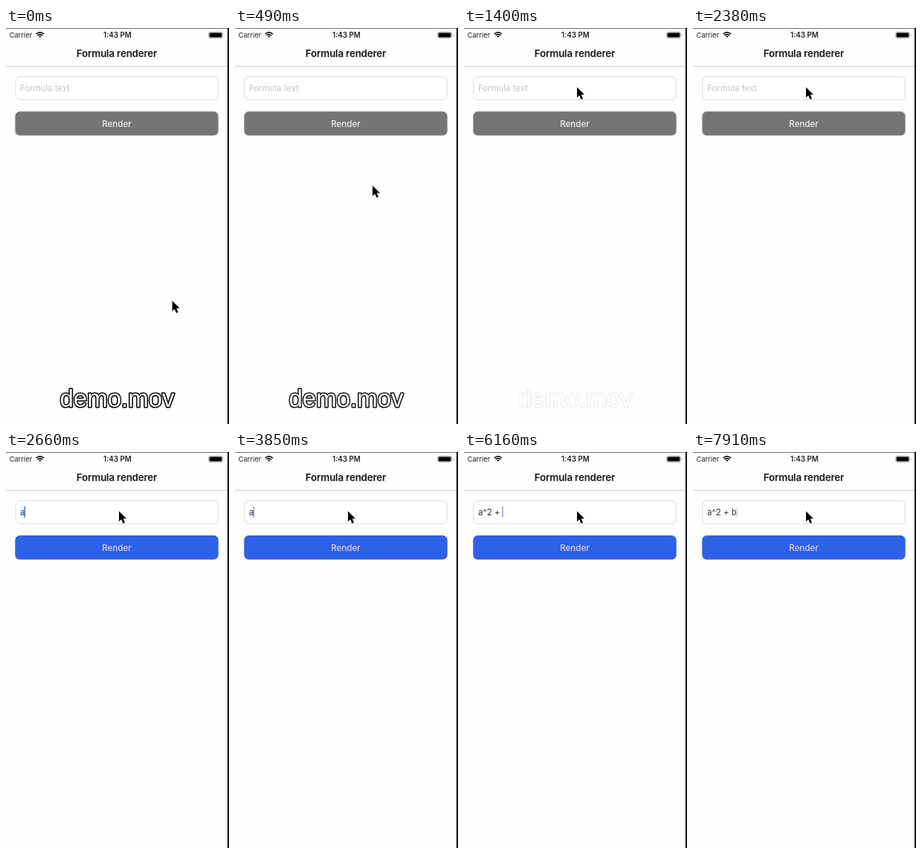
An HTML page that plays this animation: 300x532 px, repeating every 8000 ms.

```html
<!DOCTYPE html>
<html lang="en">
<head>
<meta charset="utf-8">
<title>Formula renderer</title>
<style>
  html, body { margin: 0; width: 100%; height: 100%; overflow: hidden; background: #fff; }
  svg { display: block; width: 300px; height: 532px; font-family: Inter, "Liberation Sans", sans-serif; }
  .mid { text-anchor: middle; }
  .status { font-size: 9.4px; fill: #222; }
  .clock { font-size: 9.8px; font-weight: 600; }
  .title { font-size: 13.4px; font-weight: 600; letter-spacing: -.2px; fill: #161616; }
  .input { font-size: 11.4px; fill: #333; }
  .label { font-size: 11.6px; font-weight: 500; }
  .caption {
    font: 33px "Liberation Sans", Arial, sans-serif;
    fill: #fff; stroke: #000; stroke-width: 3; stroke-linejoin: round; paint-order: stroke;
  }
</style>
</head>
<body>
<svg viewBox="0 0 300 532">
  <rect width="300" height="532" fill="#fefefe"/>
  <rect y="51" width="298" height="1" fill="#cfcfcf"/>

  <text class="status" x="4.5" y="12.6">Carrier</text>
  <g fill="none" stroke="#111" stroke-width="1.6">
    <path d="M40.6 8.2Q45.8 3.6 51 8.2M42.5 10.1Q45.8 7.2 49.1 10.1"/>
    <path d="M44 11.2Q45.8 9.8 47.6 11.2L45.8 13Z" fill="#111" stroke="none"/>
  </g>
  <text class="status clock mid" x="150" y="12.8">1:43 PM</text>
  <rect x="272.5" y="5.5" width="19" height="8" rx="2.2" fill="#fff" stroke="#999" stroke-width=".8"/>
  <rect x="273.6" y="6.5" width="16.8" height="6" rx="1.2" fill="#000"/>
  <path d="M293 8v3q1.4-1.5 0-3z" fill="#777"/>

  <text class="title mid" x="149" y="39">Formula renderer</text>

  <rect x="12.8" y="65.3" width="272.4" height="31.2" rx="6" fill="#fff" stroke="#dcdcdc"/>
  <text class="input" id="typed" x="19" y="85"></text>
  <rect id="caret" y="73" width="1.4" height="15" fill="#4667dc"/>

  <rect id="button" x="12.8" y="112.6" width="272.4" height="31.4" rx="5.5"/>
  <text class="label mid" id="label" x="149" y="132.8">Render</text>

  <text class="caption mid" id="caption" x="149.5" y="508.5">demo.mov</text>

  <path id="pointer" d="M0 0V14L3.2 11 5.5 16.4 8 15.3 5.7 10.1H10Z"
        fill="#000" stroke="#fff" stroke-width="1.4" stroke-linejoin="round" paint-order="stroke"/>

  <rect width="300" height="1" fill="#777"/>
  <rect x="298" width="2" height="532" fill="#000"/>
</svg>
<script>
  const LOOP = 8000;
  const $ = id => document.getElementById(id);
  const [typed, caret, button, label, caption, pointer] =
    ["typed", "caret", "button", "label", "caption", "pointer"].map($);

  // [time, text, caret x]
  const typing = [
    [0, "", 19.4], [2660, "a", 24.6], [4270, "a^", 30.6], [4970, "a^2", 37.2],
    [5390, "a^2 ", 40.8], [5460, "a^2 +", 48.2], [5600, "a^2 + ", 51.2], [7140, "a^2 + b", 58.8]
  ];

  // [time, opacity]
  const blink = [
    [0, 0], [2099, 0], [2100, 1], [2170, 1], [2380, 0], [2659, 0], [2660, 1],
    [3220, 1], [3360, 0], [3710, 0], [3920, 1], [6090, 1], [6300, 0],
    [6580, 0], [6720, 1], [7700, 1], [7910, .25], [8000, .25]
  ];
  const fade = [[0, 1], [420, 1], [1400, .05], [2100, .05], [2101, 0], [8000, 0]];

  const clamp = v => Math.min(1, Math.max(0, v));
  const ease = p => p * p * (3 - 2 * p);

  function track(keys, t) {
    const i = keys.findIndex(k => k[0] > t);
    const [t0, a] = keys[i - 1], [t1, b] = keys[i];
    return a + (b - a) * (t - t0) / (t1 - t0);
  }

  function draw(t) {
    const [, text, x] = typing.filter(k => k[0] <= t).pop();
    const active = text !== "";
    typed.textContent = text || "Formula text";
    typed.style.fill = active ? "#333" : "#c6c6c6";
    caret.setAttribute("x", x);
    caret.style.opacity = track(blink, t);

    button.style.fill = active ? "#2d61e8" : "#757575";
    button.style.stroke = active ? "#3d5fd2" : "#868686";
    label.style.fill = active ? "#e3cdf0" : "#f0f0f0";

    caption.style.opacity = track(fade, t);
    const p = ease(clamp((t - 70) / 800));
    pointer.setAttribute("transform", `translate(${223.6 - 71.6 * p} ${366.5 - 287 * p})`);
  }

  const start = performance.now();
  function tick() {
    draw((performance.now() - start) % LOOP);
    requestAnimationFrame(tick);
  }
  tick();
</script>
</body>
</html>
```
